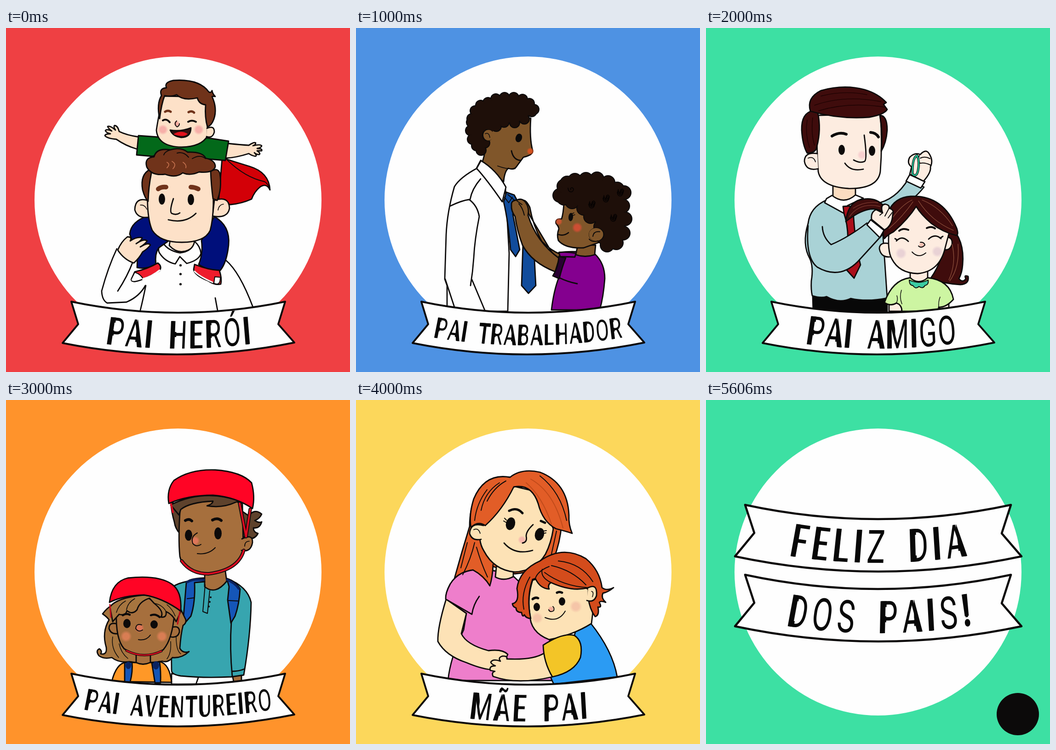
These frames come from a looping animation (748x748 px, 6010 ms). An HTML page with a canvas:

```html
<!DOCTYPE html>
<html lang="pt">
<head>
<meta charset="utf-8">
<title>Feliz dia dos pais</title>
<style>
html, body { margin: 0; width: 100%; height: 100%; overflow: hidden; }
canvas { display: block; width: 100%; height: 100%; }
</style>
</head>
<body>
<canvas id="stage" width="748" height="748"></canvas>
<script>
const ctx = document.getElementById('stage').getContext('2d');
const INK = '#0c0a0a', PAPER = '#fefefe';
ctx.lineJoin = ctx.lineCap = 'round';

function shape(d, fill, w = 2.8, ink = INK) {
  const p = new Path2D(d);
  if (fill) { ctx.fillStyle = fill; ctx.fill(p); }
  if (w) { ctx.lineWidth = w; ctx.strokeStyle = ink; ctx.stroke(p); }
}
const line = (d, w = 2.8, ink = INK) => shape(d, null, w, ink);

function dot(x, y, rx, ry = rx, fill = INK, turn = 0) {
  ctx.beginPath();
  ctx.ellipse(x, y, rx, ry, turn, 0, 7);
  ctx.fillStyle = fill;
  ctx.fill();
}

// Soft-edged blush
function blush(x, y, r, rgb, alpha = .9) {
  const g = ctx.createRadialGradient(x, y, r * .6, x, y, r * 1.15);
  g.addColorStop(0, `rgba(${rgb},${alpha})`);
  g.addColorStop(1, `rgba(${rgb},0)`);
  dot(x, y, r * 1.15, r * 1.15, g);
}

// Curly hair: a mass with a bumpy rim
function curls(pts, r, fill) {
  for (const [grow, color] of [[2, INK], [0, fill]]) {
    for (let i = 0; i < pts.length; i += 2) dot(pts[i], pts[i + 1], r + grow, r + grow, color);
  }
  ctx.beginPath();
  for (let i = 0; i < pts.length; i += 2) ctx.lineTo(pts[i], pts[i + 1]);
  ctx.fillStyle = fill;
  ctx.fill();
}

const font = (weight, size) => ctx.font = `${weight} ${size}px Roboto, sans-serif`;

// Brush contrast: a light letter with one heavy stem
function brushLetter(c, size, width) {
  font(400, size);
  ctx.fillText(c, 0, 0);
  if ('OÓSGZ'.includes(c)) return;
  if (!'IT!'.includes(c)) {
    ctx.beginPath();
    ctx.rect(c === 'A' ? width * .1 : -size, -size * 1.2, size - width * .1, size * 1.5);
    ctx.clip();
  }
  font(c === 'T' ? 700 : 900, size);
  ctx.fillText(c, 0, 0);
}

// Narrow lettering that follows the sag of a ribbon
function lettering(text, cx, base, size, gap) {
  const narrow = .66;
  font(700, size);
  ctx.fillStyle = '#080808';
  ctx.textAlign = 'center';
  const widths = [...text].map(c => c === ' ' ? size * .5 : ctx.measureText(c).width);
  const total = narrow * widths.reduce((a, b) => a + b) + gap * (text.length - 1);
  let x = cx - total / 2;
  [...text].forEach((c, i) => {
    const mid = x + narrow * widths[i] / 2, dx = mid - 374;
    ctx.save();
    ctx.translate(mid, base - .0004 * dx * dx);
    ctx.rotate(-.0008 * dx);
    ctx.transform(narrow, 0, -.04, 1, 0, 0);
    brushLetter(c, size, widths[i]);
    ctx.restore();
    x += narrow * widths[i] + gap;
  });
}

function ground(color) {
  ctx.fillStyle = color;
  ctx.fillRect(0, 0, 748, 748);
  dot(374, 374, 312, 312, PAPER);
}

function ribbon(text, size, gap, cx, base) {
  shape('M142 595Q374 643 607 595L592 644L627 684Q374 735 123 685L157 644Z', PAPER, 4);
  lettering(text, cx, base, size, gap);
}

function wideRibbon(y) {
  shape(`M85 ${y}q289 62 578 0l-20 62l43 50q-311 66 -623 0l42 -51Z`, PAPER, 4.6);
}

function hero() {
  const skin = '#fde1c8', hair = '#70331a', blue = '#000f7b', red = '#d30007', shoe = '#ee1c2c';
  shape('M470 282Q500 292 530 301Q572 314 574 352Q566 336 552 346Q540 356 534 372Q512 382 488 384L462 380Z', red);
  line('M481 287Q520 325 562 334Q570 338 574 352', 1.8);
  // child
  shape('M289 237Q262 233 246 225Q243 212 236 212Q233 214 238 222Q227 212 221 214Q222 218 230 224Q219 219 216 223Q218 228 227 230Q216 230 215 234Q219 240 240 242Q260 256 284 263', skin);
  shape('M482 251Q510 254 528 255Q540 247 543 250Q543 254 537 256Q553 252 556 256Q556 260 546 262Q558 262 556 267L546 267Q554 272 551 275Q545 276 540 271Q547 278 542 279Q533 277 528 273Q500 282 478 283', skin);
  shape('M288 234L330 237Q385 250 438 239L484 246L477 288L430 284L340 272L318 279L284 276Z', '#03691a');
  shape('M341 148Q331 195 327 222Q330 258 382 259Q425 258 438 235L438 150Z', skin);
  shape('M437 218Q453 211 453 226Q449 241 436 236', skin);
  shape('M334 197Q327 165 338 147Q332 131 349 130Q343 118 364 114Q420 110 441 139Q446 142 448 136Q449 143 455 149Q451 148 448 149Q460 175 452 198Q447 212 438 215Q432 195 434 167Q420 166 416 152Q385 159 371 145Q360 150 345 147Q338 165 334 197Z', hair);
  blush(341, 221, 10, '245,170,165'); blush(419, 221, 10, '245,170,165');
  blush(371, 208, 6, '246,165,155');
  line('M346 182Q352 178 358 182M397 183Q404 179 409 184', 5, hair);
  line('M341 201Q349 196 356 205M396 204Q404 199 413 204', 4);
  line('M371 202Q364 209 372 215Q377 213 377 208', 2);
  shape('M357 222Q380 226 402 217Q402 238 381 238Q363 236 357 222Z', '#35100f');
  shape('M364 231Q380 221 395 230Q388 239 364 231Z', '#e3111c', 0);
  // father's shirt
  shape('M241 480Q222 520 208 574Q209 598 232 599L260 598Q290 582 302 560L292 614H537Q512 545 478 505L440 480H330Z', PAPER, 0);
  line('M241 480Q222 520 208 572Q209 592 220 598L262 596Q290 584 303 560M276 508Q264 540 243 572M304 560Q298 590 292 614M478 505Q508 530 537 607M455 587L460 614');
  shape('M358 455L355 473Q380 500 411 473L408 455Z', skin);
  shape('M342 468Q328 476 333 488Q345 508 368 513L378 497L393 512Q420 505 424 490Q422 474 410 464Q406 486 378 489Q352 484 342 468Z', PAPER);
  for (const y of [516, 535, 557]) dot(379.5, y, 2.6);
  shape('M310 408Q272 420 269 448Q275 465 286 490L285 521Q305 526 326 513Q323 492 332 478L352 464Z', blue);
  shape('M453 410Q488 430 484 472Q480 510 466 527Q438 528 419 514Q429 490 425 462Z', blue);
  shape('M280 530Q308 524 330 511Q340 518 334 528Q315 540 290 549Q272 555 273 545Z', shoe);
  shape('M280 531Q294 536 298 546Q272 556 272 547Z', PAPER, 2);
  line('M298 546Q318 540 334 527', 4, PAPER);
  shape('M410 514Q440 526 464 527Q470 545 467 557Q455 560 440 550Q410 538 408 525Z', shoe);
  shape('M466 542L454 541L452 555Q466 562 466 542Z', PAPER, 2);
  line('M410 529Q420 540 449 553', 3, PAPER);
  shape('M243 483Q250 465 264 454Q275 454 270 463Q285 453 296 456Q295 462 283 469Q300 457 307 463Q302 470 292 476Q310 465 314 472Q308 480 297 487Q290 500 278 511Q257 504 243 483Z', skin);
  // father's head
  shape('M308 375Q281 367 280 395Q285 416 315 411Z', skin);
  shape('M453 375Q485 364 486 392Q482 415 449 409Z', skin);
  shape('M312 308Q301 400 318 440Q335 466 382 466Q432 466 444 440Q456 395 447 308Z', skin);
  line('M292 385Q302 384 306 394M473 383Q463 384 461 396', 1.6);
  shape('M314 307Q291 318 297 352Q302 370 309 377Q310 345 316 316Z', hair);
  shape('M445 312Q460 302 465 316Q470 350 459 375L450 371Q446 340 445 312Z', hair);
  shape('M306 302Q300 282 322 280Q327 260 357 265Q380 258 395 270Q428 269 434 283Q456 288 455 302Q450 316 420 313Q400 322 384 315Q370 327 346 318Q316 322 306 302Z', hair);
  line('M372 272Q386 268 397 281M405 284Q422 274 434 284M357 265Q345 269 343 276', 2);
  line('M350 292Q358 296 350 304M361 290Q372 296 363 306M385 292Q393 297 391 304', 1.8, '#c26f4c');
  line('M331 350Q338 345 348 346M402 346Q410 346 418 350', 10, hair);
  dot(339, 372, 7, 12); dot(402, 373, 7, 12);
  line('M364 371Q355 398 360 403Q370 408 378 402M353 417Q390 426 413 403');
}

function worker() {
  const skin = '#80562a', hair = '#1e0f09', blue = '#114c9c', purple = '#84008f';
  // father
  shape('M282 240Q282 275 273 295L321 334Q323 312 331 305Q344 310 350 300L364 281Q386 276 384 266Q377 240 380 196L300 200Z', skin);
  line('M308 300Q330 308 346 306', 1.8);
  blush(379, 268, 7, '222,82,30');
  curls([305,214,322,205,345,206,366,198,382,182,387,177,377,164,362,155,343,151,323,151,304,154,287,162,271,168,259,180,252,197,251,205,249,223,253,242,262,256,272,266,280,250], 10, hair);
  dot(286, 233, 12, 13, INK); dot(288, 233, 11, 11.5, skin);
  line('M281 230Q289 226 291 238', 1.6);
  dot(354, 239, 7, 9.5, INK, .3);
  line('M338 267Q342 287 358 288');
  shape('M263 305Q226 325 214 345Q198 400 196 450L193 546L198 560V616H330L333 490L325 350Z', PAPER);
  shape('M363 472Q380 482 388 503L391 560L375 577L360 560Z', blue);
  shape('M271 288Q305 308 326 346L318 378Q285 330 262 305Z', PAPER);
  line('M262 306L272 288M205 387Q230 375 246 373Q264 386 268 410Q258 460 256 500Q254 530 249 560M252 547L281 616M194 546L217 616M271 328Q252 350 248 373');
  shape('M327 357L344 363L352 378Q342 390 341 405Q348 440 356 482L347 497L336 482Q331 420 321 378Z', blue);
  line('M323 368L332 380L340 368', 2);
  // child
  shape('M442 488Q480 483 520 492Q541 512 541 545Q538 585 530 613H425Q430 570 442 540Z', purple);
  shape('M360 378Q367 368 378 390Q385 430 404 464Q425 485 445 492L436 505Z', skin);
  shape('M338 385Q337 375 350 374Q360 369 368 378Q378 392 374 407Q392 465 442 501L433 530Q382 510 362 472Q350 440 346 410Q337 398 338 385Z', skin);
  line('M330 362L344 374M354 382Q362 390 366 407M350 376L361 384', 2);
  shape('M441 497L456 500Q448 520 442 545L428 539Q440 520 441 497Z', '#290032');
  shape('M441 488Q460 486 478 490L476 498L444 497Z', purple);
  line('M442 543Q460 552 481 556');
  shape('M482 472L478 493Q498 500 519 493L521 472Z', skin);
  shape('M452 380Q451 403 447 415Q432 415 435 425Q441 432 441 437Q436 450 440 462Q455 480 495 478L532 465L545 420L500 380Z', skin);
  curls([443,364,452,344,459,337,476,331,500,329,524,328,548,336,568,350,583,358,580,387,585,415,581,446,566,467,546,472,538,455,532,432,510,410,495,392,470,378,452,370], 14, hair);
  // loose locks inside the hair
  for (let i = 0; i < 22; i++) {
    const x = 468 + (i * 47) % 110, y = 348 + (i * 29) % 100;
    if (y - 350 < (x - 455) * .8) line(`M${x - 7} ${y}q1 10 9 8q6 -5 0 -9q-5 1 -3 5`, 1.6, '#050202');
  }
  dot(523, 449, 17, 15, INK); dot(522, 449, 15.5, 14, skin);
  line('M530 443Q517 441 515 453M507 459Q514 467 526 463', 2);
  dot(467, 411, 5, 9, INK, .1);
  line('M469 404L474 402M470 408L476 406', 1.5);
  blush(481, 434, 10, '214,77,52'); blush(441, 421, 7, '210,84,48');
  line('M440 449Q452 453 462 445');
}

function friend() {
  const skin = '#fdece0', hair = '#3f0c0c', knit = '#a9d2d6', lime = '#cdf5a2';
  // father
  shape('M368 382Q412 375 440 328L474 346Q450 376 425 385L380 410Z', knit);
  shape('M443 319L476 334L467 348L435 333Z', PAPER);
  shape('M443 318L447 302Q436 294 443 281Q454 270 466 275Q478 262 485 273Q495 288 488 302Q490 314 473 333Z', skin);
  line('M466 283Q476 278 487 284M466 294Q476 292 488 298M464 277Q460 284 465 294', 2);
  const clip = 'M459 277Q448 282 449 318Q458 325 461 310Q465 290 459 277Z';
  line(clip, 5); line(clip, 2.6, '#23c79a');
  shape('M232 583H394V616H233Z', '#080808');
  shape('M262 374Q226 390 222 425Q208 470 226 502Q234 520 229 550Q228 570 231 582Q250 588 262 584Q290 600 315 588Q350 596 394 587Q388 500 380 380Z', knit);
  shape('M276 342V366Q300 395 325 370V345Z', '#fbdcc0');
  shape('M262 371L258 380L300 403Q303 390 308 386L342 370L325 363Q300 385 274 364Z', PAPER);
  shape('M298 388L312 387L320 396Q324 470 336 515L322 544L302 522Q316 450 300 403Z', '#ab0f1b');
  shape('M222 430Q216 500 242 520Q290 548 330 508L383 450L350 424Q310 455 272 471Q254 455 253 432', knit);
  shape('M243 190Q239 250 244 312Q250 345 310 349Q374 350 379 312Q384 250 379 186Z', skin);
  shape('M242 273Q214 269 214 290Q218 312 244 306', skin);
  line('M222 283Q234 278 238 291', 1.8);
  shape('M232 180Q207 185 208 222Q210 255 220 272Q239 272 241 258Q251 220 243 184Z', hair);
  shape('M378 190Q394 190 394 222Q392 250 381 268Q385 230 378 190Z', hair);
  shape('M227 181Q218 152 250 136Q300 122 345 134Q375 143 392 162L386 166L394 177Q388 188 355 194Q290 199 227 181Z', hair);
  line('M236 168Q300 145 380 160M245 180Q310 160 388 172M250 148Q300 135 350 145M220 200Q215 230 225 260M232 195Q228 230 236 255', 1.4, '#1d0202');
  line('M274 235Q290 225 305 231M358 227Q370 228 375 237', 6);
  dot(295, 265, 7, 11); dot(361, 267, 7, 11);
  blush(339, 276, 9, '247,205,205');
  line('M344 233Q351 285 345 290Q335 295 321 287M302 294Q315 313 342 307');
  // daughter
  shape('M530 430Q563 460 558 515Q557 532 550 545Q558 555 565 545Q560 536 570 540Q573 557 553 558Q515 556 488 545Q520 500 518 450Z', hair);
  shape('M398 598L398 616H426V598ZM508 600V616H528V592Z', skin);
  shape('M444 525V552Q465 562 482 550V525Z', skin);
  shape('M444 543Q405 548 388 597Q402 606 414 598Q426 602 426 616H505L506 607Q522 608 538 590Q530 548 482 543Q462 560 444 543Z', lime);
  line('M414 598Q418 590 415 582M506 607Q505 595 509 585M425 570Q420 585 426 600', 1.5);
  shape('M442 548Q442 560 450 560Q456 569 463 562Q472 568 476 560Q485 558 483 548Q463 558 442 548Z', '#3bcda3', 1.8);
  shape('M404 470Q377 463 377 480Q381 502 406 497', skin);
  shape('M516 456Q537 451 535 470Q530 486 516 481', skin);
  shape('M398 438Q394 485 404 502Q420 533 460 534Q508 530 520 478L530 440L460 380Z', skin);
  shape('M388 458Q380 440 396 400Q410 368 445 366Q515 362 545 435Q550 450 544 451Q515 444 490 425Q467 405 457 388Q440 415 408 443Q394 450 388 458Z', hair);
  line('M398 436Q428 410 450 378M404 415Q425 385 448 374M462 376Q490 420 538 440M470 374Q510 390 536 430M535 470Q545 510 528 548M548 470Q552 520 530 550', 1.3, '#8e503c');
  line('M420 441Q428 434 440 439M480 435Q491 430 498 436', 4);
  line('M414 463Q426 450 440 464M484 459Q498 446 511 458M411 458L416 461M509 457L515 453');
  blush(424, 490, 11, '231,207,212'); blush(503, 486, 11, '231,207,212');
  blush(469, 472, 6, '248,190,175');
  line('M462 474Q468 480 476 472Q474 465 466 466M448 487Q462 502 478 489', 2);
  // held lock of hair
  shape('M386 402Q372 390 352 395Q330 400 304 421Q308 385 330 375Q365 364 386 386Z', hair);
  line('M312 410Q335 378 378 388M320 392Q345 376 374 380', 1.3, '#7b3a30');
  shape('M358 417L387 440L378 456L350 428Z', PAPER);
  shape('M360 416Q358 400 370 395L384 402Q378 384 390 383Q400 385 398 392Q410 395 406 405Q405 430 388 439Z', skin);
  line('M384 402L378 407M398 392L389 409M405 401L396 413', 2);
}

function explorer() {
  const skin = '#a66f3d', hair = '#5e422c', lock = '#a6753f', red = '#ff0425', teal = '#37a5af', blue = '#1556b8';
  // father
  shape('M360 595V618H495V600Z', PAPER);
  line('M418 604L413 618');
  shape('M492 598L495 612H512V598Z', skin);
  shape('M432 390Q375 393 358 410L360 588Q360 597 380 600Q430 605 490 602L517 598Q532 510 533 440Q525 405 480 388Q455 425 432 390Z', teal);
  line('M490 482Q486 540 492 601M492 590Q506 590 518 585');
  shape('M432 370V406Q455 425 480 394L476 365Z', skin);
  shape('M392 398Q396 388 430 387L432 395L410 397Q412 440 402 470L388 486Q383 480 386 470Z', blue);
  shape('M480 388Q500 394 509 411Q507 445 498 470L489 485L482 435L485 406Z', blue);
  line('M394 396Q408 388 430 391M481 391Q498 398 506 410', 5, '#0b2360');
  line('M394 432L410 430M483 436L504 437M433 402L428 460L438 464L443 415', 2);
  for (const y of [429, 439, 449]) dot(445 - (y - 429) / 5, y, 2);
  shape('M505 236L528 252Q540 235 556 248Q552 258 541 262Q550 268 556 265Q552 280 538 278Q538 288 548 290Q540 306 520 300L508 290Z', hair);
  shape('M358 222Q360 245 366 265Q368 280 378 290L384 230Z', hair);
  shape('M379 232Q374 300 378 340Q385 375 440 378Q490 374 506 348L516 325L514 225L440 205Z', skin);
  shape('M513 302Q537 290 536 310Q532 332 512 327', skin);
  line('M529 307Q519 307 519 318', 1.7);
  shape('M358 228Q430 192 510 220L500 222Q470 236 437 230Q450 226 450 220Q400 222 380 238L376 250Z', hair);
  const straps = 'M508 225L522 297L531 238M517 327Q505 370 440 378Q402 378 382 350';
  line(straps, 7.5);
  line(straps + 'M358 222L363 244', 4, '#dc0b20');
  shape('M354 225Q349 195 365 175Q400 150 455 152Q512 156 534 180Q542 210 536 236Q500 211 450 207Q395 207 354 225Z', red);
  line('M390 262Q398 257 404 263M449 261Q460 255 468 262', 6);
  dot(397, 294, 8, 12); dot(461, 290, 8, 13);
  dot(412, 304, 9, 13, skin); blush(411, 306, 9, '228,119,93');
  line('M416 289Q401 297 406 312Q414 321 424 314M416 334Q440 337 455 321', 2);
  // child
  shape('M228 448Q220 452 210 465Q220 472 224 478Q208 505 218 538Q220 555 206 552Q210 545 203 541Q194 545 202 556Q212 564 230 560Q245 572 268 569Q300 575 340 568Q352 572 362 560Q382 562 398 547Q385 552 378 540Q380 510 385 490Q392 486 391 478L380 455Z', lock);
  shape('M283 550V574Q298 580 314 572V550Z', skin);
  shape('M262 570Q240 572 230 612L360 614Q356 575 335 569L313 571Q298 578 283 571Z', '#ff9827');
  shape('M258 571L274 570Q276 590 270 613H258ZM317 572L334 569Q337 590 336 615H324Z', blue);
  dot(266, 577, 6, 8, '#0b2360'); dot(326, 577, 7, 9, '#0b2360');
  shape('M242 487Q224 482 224 497Q228 510 243 508', skin);
  shape('M362 494Q378 490 377 505Q373 518 358 515', skin);
  shape('M240 460Q238 520 257 541Q300 568 342 543Q362 520 366 465L300 425Z', skin);
  line('M262 545Q300 564 338 546', 5); line('M262 545Q300 564 338 546', 2.6, '#dc0b20');
  shape('M226 450Q240 430 300 424Q355 430 380 460L370 482Q362 466 348 460Q350 474 337 472Q345 460 322 442L312 431Q290 438 285 456Q275 468 263 458Q260 470 246 466Q238 475 232 482Z', lock);
  line('M240 462Q245 445 260 437M262 456Q265 440 280 432M322 442Q340 445 348 460M350 445Q362 455 368 470M232 515Q228 540 245 560M246 530Q250 550 265 562M358 525Q360 550 350 563M370 515Q370 545 380 552', 1.5);
  line('M226 445L228 472M379 455L373 487', 3, '#c30b1c');
  shape('M225 440Q230 395 265 387Q330 380 360 400Q383 415 380 459Q340 430 300 424Q255 425 225 440Z', red);
  line('M254 468Q262 463 269 467M315 468Q325 464 334 472', 4.5);
  dot(263, 486, 8, 10); dot(322, 488, 8, 9);
  blush(261, 514, 11, '222,127,86'); blush(339, 514, 11, '222,127,86'); blush(290, 496, 9, '226,116,88');
  line('M295 489Q283 485 282 497Q288 506 297 500M288 521Q305 524 314 511', 2);
}

function motherFather() {
  const skin = '#fde2b6', hair = '#e25d27', cut = '#d44c1c', pink = '#ee7ecb';
  // mother
  shape('M335 168Q290 165 262 205Q247 235 247 275Q230 330 214 388Q250 400 291 404Q297 385 298 362L345 378Q405 372 430 345Q444 310 447 270Z', hair);
  shape('M304 372Q230 358 205 400Q194 420 196 433L240 464L234 500Q205 560 200 610H435L420 515L360 400L343 384Q320 394 304 372Z', pink);
  shape('M306 355L303 385Q322 395 342 384V365Z', skin);
  shape('M255 370Q275 385 291 404Q297 385 298 358L266 300Z', hair, 0);
  line('M255 370Q278 382 291 404Q297 385 298 358');
  shape('M340 187Q285 235 272 275Q264 305 278 328Q300 370 345 374Q390 372 412 335Q424 312 429 280L395 200Z', skin);
  shape('M277 273Q249 265 247 290Q252 307 272 303', skin);
  line('M256 282Q266 277 270 290', 1.8);
  shape('M335 168Q280 158 256 215Q245 250 250 277Q265 262 281 273Q318 240 343 189Q382 182 396 225Q406 265 435 280Q455 285 470 290Q462 272 463 250Q460 180 400 157Q360 148 335 168Z', hair);
  line('M272 240Q280 200 312 180M285 220Q300 190 326 176M258 262Q262 225 285 195M400 165Q445 200 458 262M258 310Q250 345 232 380M262 320Q272 355 286 385M242 310L228 365M436 285L425 335', 2);
  line('M380 172Q430 200 450 278M370 180Q405 210 425 270', 2, '#c04a1a');
  line('M333 241Q350 232 362 246M402 263L411 267', 5);
  dot(336, 269, 10, 14, INK, .25); dot(399, 292, 10, 14, INK, .25);
  line('M327 261L323 257M326 266L321 263M407 285L414 284M408 290L413 289', 2);
  blush(361, 304, 8, '247,180,172');
  line('M385 271Q370 285 370 296Q373 309 362 311M322 311Q345 338 384 327');
  shape('M196 433Q177 495 178 525Q195 556 240 571Q290 592 316 585Q325 565 330 553Q318 541 288 545Q240 532 229 508L240 464Z', skin);
  shape('M205 400Q194 420 195 433L252 466Q255 445 268 427L245 390Z', pink, 0);
  line('M205 400Q194 420 195 433L252 466Q255 445 268 427');
  // son
  shape('M510 485Q558 545 568 602L430 618L422 600Q465 560 478 500Z', '#2b9bf3');
  shape('M384 392Q372 430 378 465Q378 505 420 521Q470 512 512 486L520 420L440 375Z', skin);
  shape('M384 390Q370 430 380 475Q370 475 366 467Q362 474 360 462Q348 462 348 452Q341 450 340 443Q356 440 350 410Q355 370 400 350Q450 315 500 345Q530 370 535 408Q545 416 560 408Q548 418 537 420Q532 430 543 440Q532 436 529 440Q536 452 526 450Q530 468 520 471Q508 455 505 430L505 408Q470 418 424 397Q416 402 420 411Q400 410 390 388Z', cut);
  shape('M505 408Q525 398 523 425Q518 441 502 436', skin);
  line('M512 416Q518 417 514 428', 1.6);
  line('M390 388Q395 372 420 362M424 397Q400 385 405 368M410 375Q450 405 505 408M425 360Q470 370 500 402M440 350Q490 355 515 395M365 455Q358 420 378 385', 2);
  line('M384 433Q390 428 396 431M437 419Q442 416 448 419', 5);
  dot(393, 450, 7, 9); dot(448, 438, 7, 9);
  blush(394, 474, 11, '244,194,166'); blush(478, 449, 12, '244,194,166'); blush(424, 455, 6, '245,165,150');
  line('M419 456Q422 463 430 458Q432 452 428 449M411 473Q440 485 455 459', 2);
  shape('M410 550Q385 566 328 563Q330 556 318 557Q308 560 314 568Q298 562 293 570Q294 574 303 578Q289 578 292 588L302 590Q294 592 298 601Q350 620 427 602Z', skin);
  shape('M407 533Q450 505 475 512Q495 525 488 560Q475 592 427 602Q408 570 407 533Z', '#f3c527');
}

const scenes = [
  () => { ground('#ef4043'); hero(); ribbon('PAI HERÓI', 84, 5, 375, 697); },
  () => { ground('#4e92e3'); worker(); ribbon('PAI TRABALHADOR', 63, 2, 374, 690); },
  () => { ground('#3de0a3'); friend(); ribbon('PAI AMIGO', 87, 3, 381, 697); },
  () => { ground('#ff932b'); explorer(); ribbon('PAI AVENTUREIRO', 65, 2.4, 374, 690); },
  () => { ground('#fcd75b'); motherFather(); ribbon('MÃE PAI', 81, 5.5, 375, 699); },
  () => {
    ground('#3de0a3');
    wideRibbon(228); lettering('FELIZ DIA', 374, 354, 100, 10);
    wideRibbon(380); lettering('DOS PAIS!', 376, 507, 98, 10.5);
    dot(678, 683, 46);
  }
];

const LOOP = 6010;
let shown = -1;
function play() {
  const i = Math.min(5, Math.floor(performance.now() % LOOP / 1000));
  if (i !== shown) scenes[shown = i]();
  requestAnimationFrame(play);
}
play();
</script>
</body>
</html>
```
